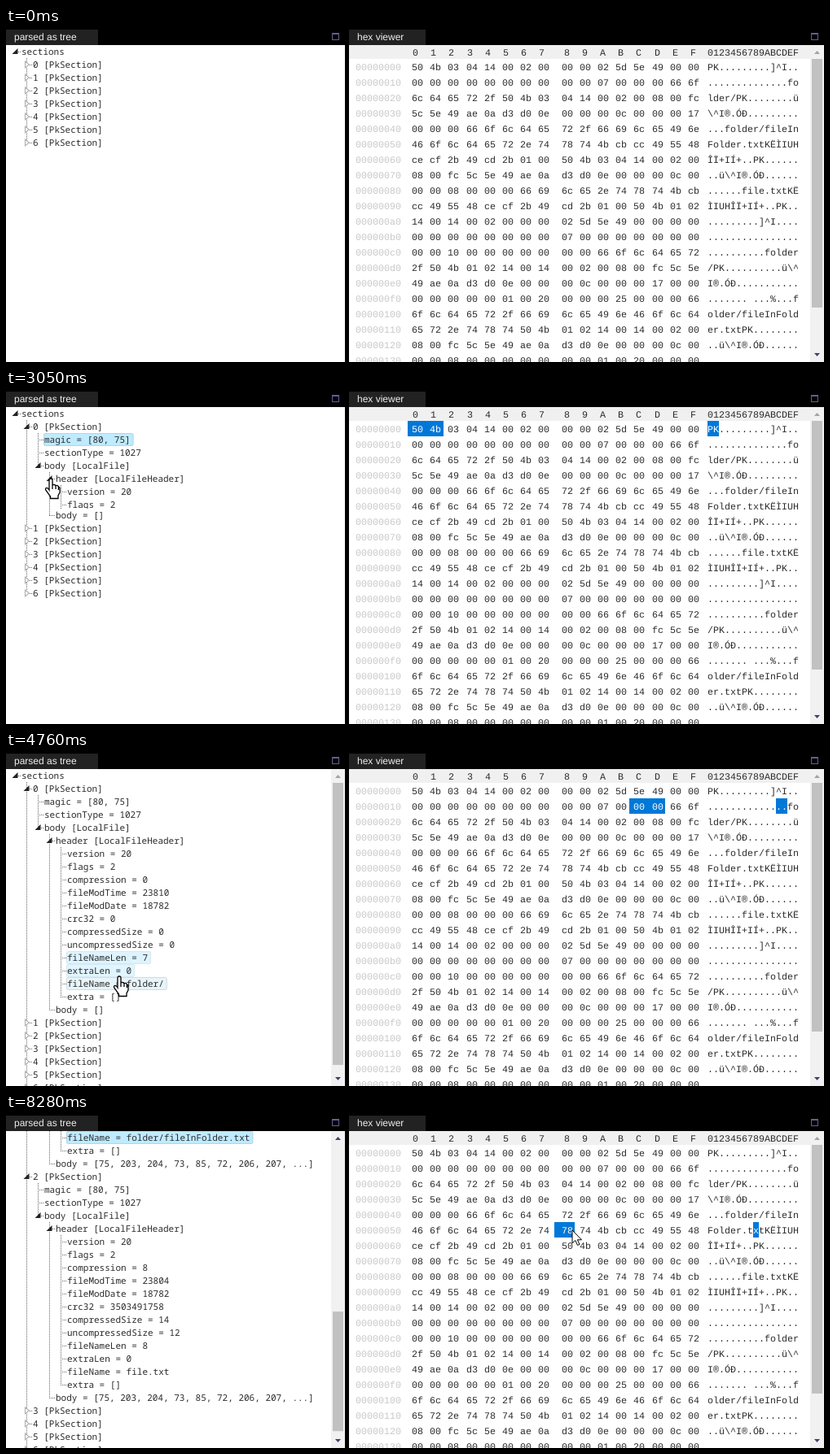
Write an HTML page with a canvas that moves like this. It is 1004 by 411 pixels and loops after 9360 ms.

```html
<!DOCTYPE html>
<html lang="en">
<head>
<meta charset="utf-8">
<title>Tree and hex viewer</title>
<style>
html, body { margin: 0; width: 100%; height: 100%; overflow: hidden; background: #fff; }
canvas { display: block; }
</style>
</head>
<body>
<canvas id="stage" width="1004" height="411"></canvas>
<script>
const LOOP = 9360, ROW = 16, TOP = 21, VIEW = 390, INK = '#2b2b2b';
const TREE_FONT = '11px "Noto Sans Mono", monospace';
const HEX_FONT = '11.67px "Liberation Mono", monospace';
const TAB_FONT = '12px "Liberation Sans", sans-serif';
const ctx = document.getElementById('stage').getContext('2d');
let t = 0, pointer = { x: 0, y: 0 };

const clamp = v => Math.max(0, Math.min(1, v));
const fade = start => clamp((t - start) / 150);

function rect(color, x, y, w, h) {
  ctx.fillStyle = color;
  ctx.fillRect(x, y, w, h);
}
function poly(color, ...p) {
  ctx.fillStyle = color;
  ctx.beginPath();
  for (let i = 0; i < p.length; i += 2) ctx.lineTo(p[i], p[i + 1]);
  ctx.closePath();
  ctx.fill();
}
function label(text, x, y, color) {
  ctx.fillStyle = color;
  ctx.fillText(text, x, y);
}

// ---- the zip file: its bytes and its tree are built together
const SIZES = {
  version: 2, flags: 2, compression: 2, fileModTime: 2, fileModDate: 2, crc32: 4,
  compressedSize: 4, uncompressedSize: 4, fileNameLen: 2, extraLen: 2
};
const packed = [75, 203, 204, 73, 85, 72, 206, 207, 43, 73, 205, 43, 1, 0];
const files = [
  { name: 'folder/', time: 23810, crc: 0, size: 0, data: [], attr: 16 },
  ...['folder/fileInFolder.txt', 'file.txt'].map(name =>
    ({ name, time: 23804, crc: 3503491758, size: 12, data: packed, attr: 32 }))
];
const bytes = [];
const ascii = s => [...s].map(c => c.charCodeAt(0));
const le = (n, size) => Array.from({ length: size }, (_, i) => Math.floor(n / 256 ** i) % 256);
const node = (text, span, kids) => ({ text, span, kids, openAt: -1e4 });

// appends bytes and returns the span they fill
function put(...list) {
  const at = bytes.length;
  bytes.push(...list);
  return [at, bytes.length];
}
const headOf = f => ({
  version: 20, flags: 2, compression: f.data.length ? 8 : 0, fileModTime: f.time,
  fileModDate: 18782, crc32: f.crc, compressedSize: f.data.length,
  uncompressedSize: f.size, fileNameLen: f.name.length, extraLen: 0
});
const putHead = f => Object.entries(headOf(f)).map(([key, v]) =>
  node(`${key} = ${v}`, put(...le(v, SIZES[key]))));

function localSection(f, i) {
  f.offset = bytes.length;
  const magic = node('magic = [80, 75]', put(...ascii('PK')));
  const type = node('sectionType = 1027', put(3, 4));
  const fields = putHead(f);
  fields.push(node('fileName = ' + f.name, put(...ascii(f.name))), node('extra = []'));
  const header = node('header [LocalFileHeader]', [f.offset + 4, bytes.length], fields);
  put(...f.data);
  const shown = f.data.length ? f.data.slice(0, 8).join(', ') + ', ...' : '';
  const body = node('body [LocalFile]', null, [header, node(`body = [${shown}]`)]);
  return node(i + ' [PkSection]', null, [magic, type, body]);
}
function centralSection(f, i) {
  put(...ascii('PK'), 1, 2, ...le(20, 2));
  putHead(f);
  put(...le(0, 4), ...le(f.data.length ? 1 : 0, 2), ...le(f.attr, 4), ...le(f.offset, 4), ...ascii(f.name));
  return node(i + 3 + ' [PkSection]', null, []);
}
const sections = [...files.map(localSection), ...files.map(centralSection), node('6 [PkSection]', null, [])];
const root = node('sections', null, sections);
const [magic, type, body] = sections[0].kids;
const headerOf = i => sections[i].kids[2].kids[0];
const field = (i, name) => headerOf(i).kids.find(k => k.text.startsWith(name + ' ='));
for (const s of sections) s.openAt = 1e4;

// ---- pointer stops: it rests for `hold` and leaves at `at`; a stop with an action is a click
const stop = (at, x, y, hold = 0, action = null) => ({ at, x, y, hold, ...action, click: !!action });
const stops = [
  stop(40, 808, 367),
  stop(1050, 27, 49, 90, { open: sections[0] }),
  stop(1190, 31, 51),
  stop(1480, 76, 61, 70, { pick: magic }),
  stop(1750, 75, 77, 70, { pick: type }),
  stop(2310, 74, 63, 380, { pick: magic }),
  stop(2620, 39, 94, 70, { open: body }),
  stop(3000, 54, 110, 70, { open: headerOf(0) }),
  stop(3685, 106, 114, 110, { pick: headerOf(0) }),
  stop(4020, 92, 126, 70, { pick: field(0, 'version') }),
  stop(4490, 120, 257, 70, { pick: field(0, 'fileNameLen') }),
  stop(4690, 138, 276, 70, { pick: field(0, 'extraLen') }),
  stop(5120, 141, 281, 230),
  stop(5960, 898, 214),
  stop(6130, 920, 207, 50, { pick: field(2, 'fileName'), byte: 136, open: sections[2] }),
  stop(6800, 920, 207),
  stop(7450, 665, 154),
  stop(8030, 695, 143, 210, { pick: field(1, 'fileName'), byte: 88, open: sections[1] }),
  stop(LOOP, 695, 143)
];
const picks = [{ at: 1040, pick: magic, span: [0, 0] }];
for (const s of stops) {
  if (s.open) s.open.openAt = s.at;
  if (s.pick) picks.push({ at: s.at, pick: s.pick, span: s.byte ? [s.byte, s.byte + 1] : s.pick.span });
}

// ---- tree drawing
const opened = n => n.kids ? .5 - Math.cos(Math.PI * clamp((t - n.openAt) / 200)) / 2 : 0;
const kidsHeight = n => Math.round(opened(n) * n.kids.reduce((sum, k) => sum + height(k), 0));
const height = n => ROW + (n.kids ? kidsHeight(n) : 0);
const scrollTop = () => t < 6330 ? 0 : t < 8250 ? 282 : 34 * ROW;

function dots(x1, y1, x2, y2) {
  ctx.strokeStyle = '#666';
  ctx.lineWidth = 1;
  ctx.setLineDash([1, 1]);
  ctx.beginPath();
  ctx.moveTo(x1, y1);
  ctx.lineTo(x2, y2);
  ctx.stroke();
  ctx.setLineDash([]);
}
function box(x, y, w, color, alpha) {
  if (alpha <= 0) return;
  ctx.fillStyle = color;
  ctx.strokeStyle = '#999';
  ctx.lineWidth = 1;
  ctx.globalAlpha = alpha;
  ctx.beginPath();
  ctx.roundRect(x, y - 8, w, 16, 2);
  ctx.fill();
  ctx.globalAlpha = alpha * .25;
  ctx.beginPath();
  ctx.roundRect(x + .5, y - 7.5, w - 1, 15, 2);
  ctx.stroke();
  ctx.globalAlpha = 1;
}
function drawNode(n, x, y) {
  const mid = x - 8, w = n.text.length * 6.6 + 5;
  const dx = pointer.x - x + 1, dy = pointer.y + scrollTop() - y + 8;
  if (t > 40 && dx > 0 && dx < w && dy >= 0 && dy < ROW) box(x - 1, y, w, '#e7f4f9', 1);
  let chosen = 0;
  picks.forEach((p, i) => {
    if (p.pick === n) chosen += fade(p.at) - (picks[i + 1] ? fade(picks[i + 1].at) : 0);
  });
  box(x - 1, y, w, '#beebff', chosen);

  const open = opened(n);
  dots(mid, y + .5, x, y + .5);
  if (open > 0) {
    poly('#222', mid + 3.5, y - 4, mid + 3.5, y + 3, mid - 3.5, y + 3);
  } else if (n.kids) {
    poly('#aaa', mid - 2, y - 5, mid + 4, y, mid - 2, y + 5);
    poly('#fff', mid - 1, y - 2.8, mid + 2.4, y, mid - 1, y + 2.8);
  }
  label(n.text, x, y + 4, INK);
  if (open <= 0 || !n.kids.length) return;

  ctx.save();
  ctx.beginPath();
  ctx.rect(0, y + 8, 416, kidsHeight(n));
  ctx.clip();
  let ky = y + ROW;
  const tops = n.kids.map(k => { const at = ky; ky += height(k); return at; });
  dots(x + 6.5, y + 8, x + 6.5, tops[tops.length - 1]);
  n.kids.forEach((k, i) => drawNode(k, x + 14, tops[i]));
  ctx.restore();
}
function scrollbar(x, from, size, atTop) {
  rect('#f1f1f1', x, TOP, 17, VIEW);
  rect('#c1c1c1', x + 2, from, 13, size);
  poly(atTop ? '#a3a3a3' : '#45406a', x + 5, 32, x + 8.5, 28, x + 12, 32);
  poly('#45406a', x + 5, 400, x + 8.5, 404, x + 12, 400);
}
function drawTree() {
  const scroll = scrollTop(), total = height(root);
  ctx.font = TREE_FONT;
  ctx.save();
  ctx.beginPath();
  ctx.rect(0, TOP, 416, VIEW);
  ctx.clip();
  ctx.translate(0, -scroll);
  drawNode(root, 19, 29);
  ctx.restore();
  if (total > VIEW)
    scrollbar(399, 38 + 356 * scroll / total, 356 * VIEW / total, scroll === 0);
}

// ---- hex viewer
const cellX = i => 492.5 + 22.2 * i + (i > 7 ? 6 : 0);
const hex = (n, size) => n.toString(16).padStart(size, '0');
const printable = c => c < 32 || (c > 126 && c < 161) ? '.' : String.fromCharCode(c);

function drawHex() {
  const digits = '0123456789ABCDEF';
  ctx.font = HEX_FONT;
  rect('#f0f0f0', 421, TOP, 566, 17);
  [...digits].forEach((d, i) => label(d, Math.round(cellX(i) + (i > 7 ? 8.5 : 6.5)), 34, INK));
  label(digits, 861, 34, INK);

  const picked = picks.filter(p => t >= p.at).pop();
  const [a, b] = picked ? picked.span : [0, 0];
  for (let r = 0; r < 20; r++) {
    const y = 38 + 19 * r;
    const from = Math.max(a - 16 * r, 0), to = Math.min(b - 16 * r, 16);
    if (from < to) {
      const left = Math.round(cellX(from) - (from === 8 ? 3 : 0));
      rect('#0078d7', left, y, Math.round(cellX(to - 1) + 22.2) - left, 19);
      rect('#0078d7', 861 + 7 * from, y, 7 * (to - from), 19);
    }
    label(hex(16 * r, 8), 429, y + 14, '#c8c8c8');
    for (let i = 0; i < 16; i++) {
      const value = bytes[16 * r + i], color = i >= from && i < to ? '#fff' : INK;
      label(hex(value, 2), Math.round(cellX(i) + 5.5), y + 14, color);
      label(printable(value), 861 + 7 * i, y + 14, color);
    }
  }
  scrollbar(987, 38, 306, true);
}

// ---- window frame
function drawTab(x, w, title, iconX) {
  rect('#222', x, 2, w, 19);
  ctx.font = TAB_FONT;
  label(title, x + 10, 15, '#eee');
  ctx.strokeStyle = '#6a5a94';
  ctx.lineWidth = 1;
  ctx.strokeRect(iconX + .5, 6.5, 8, 8);
  rect('#6a5a94', iconX, 6, 9, 2);
}

// ---- pointer
const arrow = new Path2D('M0,0 V16 L3.8,12.6 6.5,18.5 9,17.4 6.4,11.8 H11.5 Z');
const hand = new Path2D('M-2,1 Q-2,-1 0,-1 Q2,-1 2,1 V7.5 Q2.5,6.3 4,6.5 Q5.6,6.6 6,8 ' +
  'Q7,7 8.3,7.6 Q9.4,8 9.4,9.5 Q11,9 11,11 V16 L9,20 V23.5 H-.5 V21 L-6,13.5 ' +
  'Q-7.3,11 -5.3,10.3 Q-3.6,10.2 -2,13 Z M2,7.5 V12 M6,8 V12 M9.4,9.5 V13');

function movePointer() {
  const i = Math.max(1, stops.findIndex(s => s.at > t));
  const from = stops[i - 1], to = stops[i];
  const p = clamp((t - from.at) / (to.at - to.hold - from.at)), e = p * p * (3 - 2 * p);
  pointer = {
    x: Math.round(from.x + (to.x - from.x) * e),
    y: Math.round(from.y + (to.y - from.y) * e),
    pressed: to.click && t > to.at - Math.min(to.hold, 110)
  };
}
function drawPointer() {
  if (t < 40) return;
  ctx.save();
  ctx.translate(pointer.x, pointer.y);
  if (pointer.pressed) {
    ctx.fillStyle = 'rgba(240, 236, 30, .7)';
    ctx.beginPath();
    ctx.arc(2, 6, 28, 0, 7);
    ctx.fill();
  }
  const shape = pointer.x < 160 ? hand : arrow;
  ctx.fillStyle = '#fff';
  ctx.strokeStyle = '#000';
  ctx.lineWidth = shape === hand ? 1.3 : 1;
  ctx.fill(shape);
  ctx.stroke(shape);
  ctx.restore();
}

function frame() {
  t = performance.now() % LOOP;
  ctx.textRendering = 'geometricPrecision';
  movePointer();
  rect('#fff', 0, 0, 1004, 411);
  drawTree();
  drawHex();
  rect('#000', 0, 0, 1004, TOP);
  rect('#000', 416, 0, 5, 411);
  drawTab(0, 113, 'parsed as tree', 400);
  drawTab(421, 94, 'hex viewer', 988);
  drawPointer();
  requestAnimationFrame(frame);
}
requestAnimationFrame(frame);
</script>
</body>
</html>
```
